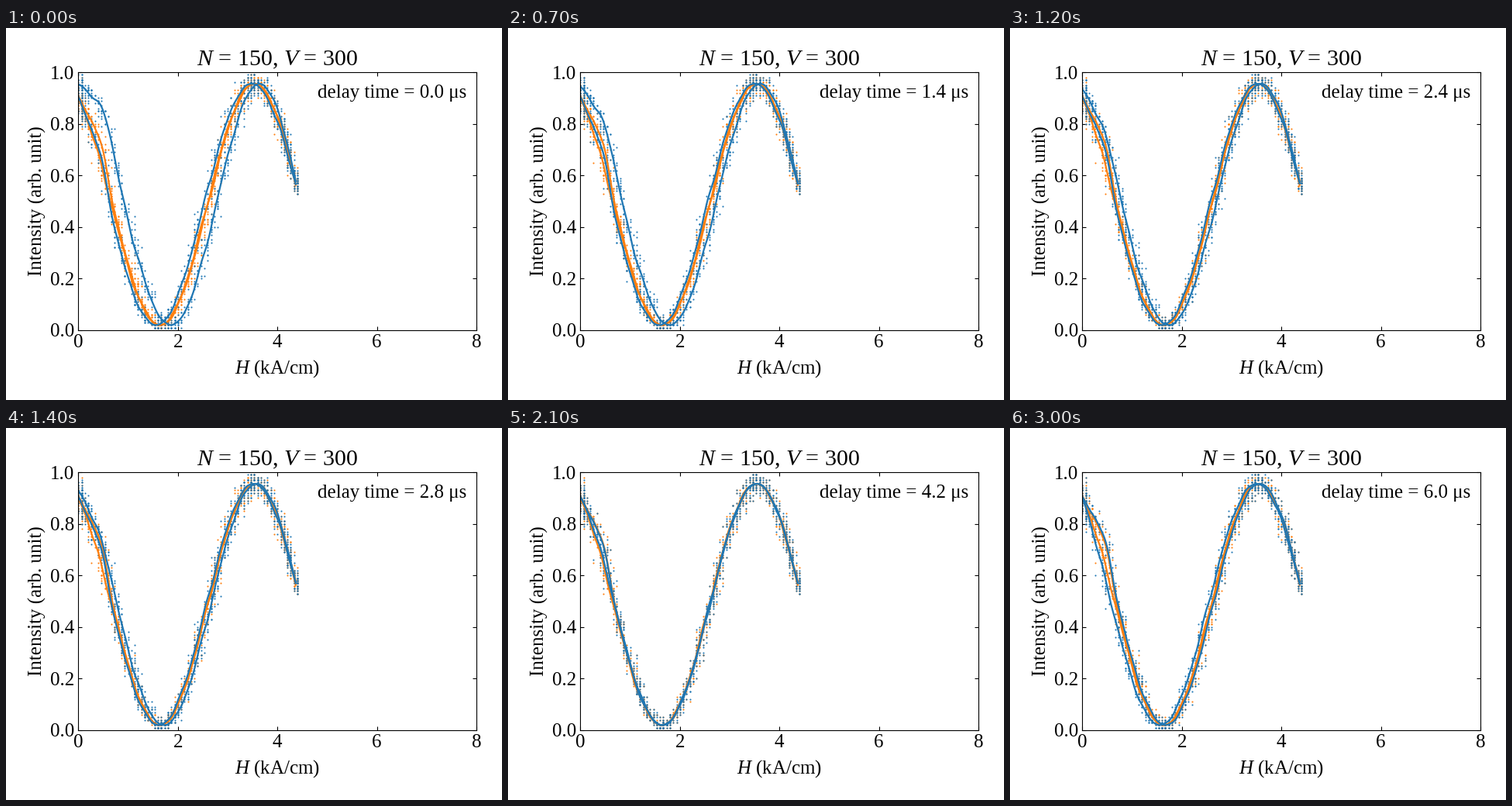
Recreate the animation shown at these times as a matplotlib script. Size 640 by 480 pixels, loop 3.1 s.

```python
import numpy as np
import matplotlib.pyplot as plt
from matplotlib.animation import FuncAnimation

FRAMES, INTERVAL = 31, 100
H_END = 4.37
PX = 8 / 513            # field units per pixel
DH, DI = 0.0667, 0.01   # digitiser steps in field and intensity
BLUE, ORANGE = "C0", "C1"

plt.rcParams.update({
    "font.family": "Liberation Serif",
    "font.size": 18,
    "mathtext.fontset": "custom",
    "mathtext.rm": "Liberation Serif",
    "mathtext.it": "Liberation Serif:italic",
    "xtick.direction": "in",
    "ytick.direction": "in",
    "xtick.top": True,
    "ytick.right": True,
})

grid = np.linspace(0, H_END, 260)


def intensity(h):
    """Interference fringe as a function of the effective field."""
    phase = 0.49 + 1.6 * h + 0.01 * h**2
    return 0.4875 + 0.4675 * np.cos(phase)


def bump(h):
    return 0.1 * np.exp(-((h - 0.42) / 0.23) ** 2)


def ripple(h, k):
    return 0.008 * np.sin(14 * h + k) + 0.006 * np.sin(23 * h + 2.3 * k)


def rising_lag(h, delay):
    lag = (-5 + 1.2 * delay) * PX * (1 - (h / 4.45) ** 5)
    return lag * np.tanh(h / 0.35) + bump(h)


def falling_lag(h, delay):
    lag = (16 - 3.6 * delay) * PX * (1 - (h / 4.45) ** 2.5)
    lag = np.where(lag > 0, lag, lag * np.tanh(h / 0.25))
    return lag + 1.3 * max(0, 1 - delay / 4.5) * bump(h - 0.1)


def rising_base(h, _):
    return bump(h) + 0.008


def falling_base(h, _):
    return 0 * h - 0.008


class Branch:
    """One sweep direction: noisy samples plus the smoothed curve."""

    def __init__(self, ax, lag, color, seed, z):
        self.lag, self.seed = lag, seed
        rng = np.random.default_rng(seed)
        h = np.concatenate([
            rng.uniform(0, 4.3, 500),
            rng.uniform(0, 0.09, 36),
            rng.uniform(4.2, 4.42, 45),
        ])
        self.h = np.round(h / DH) * DH
        self.dx = rng.normal(0, 0.05, h.size)
        spread = np.where(self.h < 0.08, 0.035, 0.012 + 0.012 * intensity(self.h))
        self.dy = rng.normal(0, 1, h.size) * spread
        self.dots, = ax.plot([], [], "o", ms=1.5, mew=0, color=color, zorder=z)
        self.line, = ax.plot([], [], lw=1.6, color=color, zorder=z + 0.2)

    def update(self, delay):
        field = np.minimum(self.h - self.lag(self.h, delay) + self.dx, H_END)
        y = intensity(field) + self.dy
        y = np.clip(np.round(y / DI) * DI, 0.01, 0.99)
        self.dots.set_data(self.h, y)
        shift = self.lag(grid, delay) + ripple(grid, self.seed)
        self.line.set_data(grid, intensity(grid - shift))


fig = plt.figure(figsize=(6.4, 4.8), dpi=100)
fig.subplots_adjust(left=93.3 / 640, right=607 / 640, bottom=0.1875, top=423 / 480)
ax = fig.add_subplot()
ax.set(xlim=(0, 8), ylim=(0, 1), xticks=range(0, 9, 2), yticks=np.arange(6) / 5)
ax.set_xlabel("$H$ (kA/cm)", labelpad=6.7)
ax.set_ylabel("Intensity (arb. unit)")
ax.set_title("$N$ = 150, $V$ = 300")
label = ax.text(0.6, 0.9, "", transform=ax.transAxes)

# Both colours of a sweep share their noise.
branches = [
    Branch(ax, rising_base, ORANGE, 1, 2.0),
    Branch(ax, falling_base, ORANGE, 2, 2.0),
    Branch(ax, rising_lag, BLUE, 1, 2.1),
    Branch(ax, falling_lag, BLUE, 2, 2.1),
]


def update(frame):
    delay = 0.2 * frame
    for branch in branches:
        branch.update(delay)
    label.set_text(f"delay time = {delay:.1f} μs")
    return []


anim = FuncAnimation(fig, update, frames=FRAMES, interval=INTERVAL,
                     repeat=True, repeat_delay=0)
plt.show()
```
